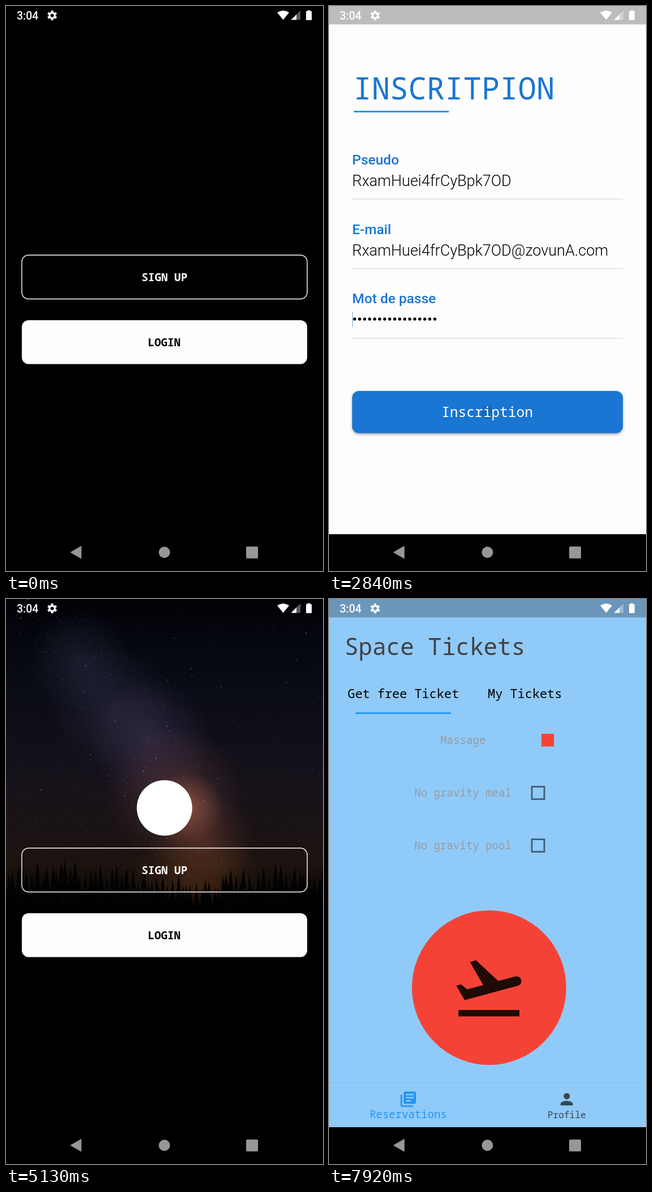
An HTML page with a canvas that plays this animation: 561 by 998 pixels, repeating every 8000 ms.

```html
<!DOCTYPE html>
<html lang="fr">
<head>
<meta charset="utf-8">
<title>Space tickets</title>
<style>
html, body { margin: 0; width: 100%; height: 100%; overflow: hidden; background: #000; }
canvas { display: block; width: 100vw; height: 100vh; }
</style>
</head>
<body>
<canvas id="stage"></canvas>
<script>
const W = 561, H = 998, BODY = 933, LOOP = 8000;
const MONO = '"Noto Sans Mono", "DejaVu Sans Mono", monospace';
const SANS = 'Roboto, "Open Sans", sans-serif';
const BLUE = '#1976d2', ACCENT = '#2196f3', SKY = '#90caf9', RED = '#f44336', PAPER = '#fdfdfd';
const USER = 'RxamHuei4frCyBpk7OD', MAIL = USER + '@zovunA.com';
const SHADE = 'rgba(0,0,0,.26)';

const ICONS = {
  books: new Path2D('M4 6H2v14c0 1.1.9 2 2 2h14v-2H4V6zm16-4H8c-1.1 0-2 .9-2 2v12c0 1.1.9 2 2 2h12c1.1 0 2-.9 2-2V4c0-1.1-.9-2-2-2zm-1 9H9V9h10v2zm-4 4H9v-2h6v2zm4-8H9V5h10v2z'),
  person: new Path2D('M12 12c2.21 0 4-1.79 4-4s-1.79-4-4-4-4 1.79-4 4 1.79 4 4 4zm0 2c-2.67 0-8 1.34-8 4v2h16v-2c0-2.66-5.33-4-8-4z'),
  takeoff: new Path2D('M2.5 19h19v2h-19zm19.57-9.36c-.21-.8-1.04-1.28-1.84-1.06L14.92 10l-6.9-6.43-1.93.51 4.14 7.17-4.97 1.33-1.97-1.54-1.45.39 1.82 3.16.77 1.33 1.6-.43 5.31-1.42 4.35-1.16L21 11.49c.81-.23 1.28-1.05 1.07-1.85z')
};

const canvas = document.getElementById('stage');
const dpr = window.devicePixelRatio || 1;
canvas.width = W * dpr;
canvas.height = H * dpr;
const g = canvas.getContext('2d');

const clamp = v => Math.max(0, Math.min(1, v));
const prog = (t, a, b) => clamp((t - a) / (b - a));
const easeOut = p => 1 - (1 - p) ** 3;
const mix = (a, b, p) => a + (b - a) * p;

function text(str, x, y, font, color, align = 'left') {
  g.font = font;
  g.fillStyle = color;
  g.textAlign = align;
  g.fillText(str, x, y);
}

function rect(x, y, w, h, color) {
  g.fillStyle = color;
  g.fillRect(x, y, w, h);
}

function disc(x, y, r, color) {
  g.fillStyle = color;
  g.beginPath();
  g.arc(x, y, r, 0, Math.PI * 2);
  g.fill();
}

function poly(color, ...pts) {
  g.fillStyle = color;
  g.beginPath();
  pts.forEach(p => g.lineTo(p[0], p[1]));
  g.fill();
}

function roundRect(x, y, w, h, r) {
  g.beginPath();
  g.roundRect(x, y, w, h, r);
}

function icon(name, x, y, scale, color) {
  g.save();
  g.translate(x, y);
  g.scale(scale, scale);
  g.fillStyle = color;
  g.fill(ICONS[name]);
  g.restore();
}

function layer(alpha, dx, dy, draw) {
  if (alpha <= 0) return;
  g.save();
  g.globalAlpha = alpha;
  g.translate(dx, dy);
  draw();
  g.restore();
}

// Night sky, painted once
const sky = (() => {
  const c = document.createElement('canvas');
  c.width = W;
  c.height = 560;
  const s = c.getContext('2d');
  let seed = 11;
  const rnd = () => (seed = seed * 16807 % 2147483647) / 2147483647;
  const base = s.createLinearGradient(0, 0, 0, 560);
  [[0, '#020308'], [.3, '#0a0c16'], [.6, '#17121a'], [.84, '#1c130f'], [1, '#000']]
    .forEach(([p, col]) => base.addColorStop(p, col));
  s.fillStyle = base;
  s.fillRect(0, 0, W, 560);

  const haze = (x, y, r, rgb, a) => {
    const grad = s.createRadialGradient(x, y, 0, x, y, r);
    grad.addColorStop(0, `rgba(${rgb},${a})`);
    grad.addColorStop(1, `rgba(${rgb},0)`);
    s.fillStyle = grad;
    s.fillRect(x - r, y - r, r * 2, r * 2);
  };
  haze(130, 110, 90, '60,62,92', .35);
  haze(190, 190, 110, '66,62,96', .35);
  haze(255, 250, 110, '80,68,110', .4);
  haze(300, 345, 120, '120,70,70', .45);
  haze(320, 370, 65, '200,115,80', .55);
  haze(350, 430, 90, '130,70,60', .4);
  haze(335, 530, 130, '130,70,25', .4);

  for (let i = 0; i < 620; i++) {
    const y = rnd() * 500;
    const x = i % 2 ? rnd() * W : 70 + y * .62 + (rnd() + rnd() - 1) * 130;
    const size = rnd() < .06 ? 1.8 : 1;
    s.fillStyle = `rgba(175,175,215,${.1 + rnd() * .5})`;
    s.fillRect(x, y, size, size);
  }

  s.fillStyle = '#030303';
  for (let x = -6; x < W + 8; x += 5 + rnd() * 7) {
    const side = Math.abs(x - 330) / 330;
    const top = 522 - side * 28 - rnd() * 36;
    for (let k = 0; k < 4; k++) {
      const y = top + k * 13, half = 3 + k * 2.4;
      s.beginPath();
      s.moveTo(x, y - 8);
      s.lineTo(x + half, y + 14);
      s.lineTo(x - half, y + 14);
      s.fill();
    }
  }
  const fade = s.createLinearGradient(0, 510, 0, 552);
  fade.addColorStop(0, 'rgba(0,0,0,0)');
  fade.addColorStop(1, '#000');
  s.fillStyle = fade;
  s.fillRect(0, 510, W, 50);
  return c;
})();

function welcome(photo) {
  rect(0, 0, W, H, '#000');
  if (photo) {
    g.drawImage(sky, 0, 0);
    disc(280.5, 369, 49, '#fff');
  }
  roundRect(28, 440, 505, 77.5, 12);
  g.strokeStyle = '#fff';
  g.lineWidth = 1.4;
  g.stroke();
  text('SIGN UP', 280.5, 486, `700 19.3px ${MONO}`, '#fff', 'center');
  roundRect(28, 555, 505, 77.5, 12);
  g.fillStyle = PAPER;
  g.fill();
  text('LOGIN', 280, 601, `700 19.3px ${MONO}`, '#000', 'center');
}

function field(t, f, size) {
  text(f.label, 41, f.y, `500 ${size}px ${SANS}`, BLUE);
  rect(41, f.line, 479, 1.2, '#dadada');
  if (t < f.at) return;
  if (f.value) text(f.value, 41, f.y + f.drop, `300 27px ${SANS}`, '#000');
  else for (let i = 0; i < 17; i++) disc(45.3 + i * 8.87, f.y + f.drop, 2.7, '#000');
  if (t < f.until && (t - f.at) % 1000 < 500) rect(41, f.y + 15, 1, 27, '#7fa5c0');
}

function button(label, y, on, ripple) {
  g.save();
  roundRect(41, y, 479, 74.5, 12);
  if (on) {
    g.shadowColor = 'rgba(0,0,0,.36)';
    g.shadowBlur = 5 * dpr;
    g.shadowOffsetY = 2 * dpr;
  }
  g.fillStyle = on ? BLUE : SHADE;
  g.fill();
  g.restore();
  if (ripple > 0) disc(280.5, y + 37.5, 23.5 * ripple, 'rgba(0,0,0,.13)');
  text(label, 280, y + 46, `500 24.5px ${MONO}`, '#fff', 'center');
}

const signUpFields = [
  { label: 'Pseudo', value: USER, y: 279.5, drop: 38, line: 340.5, at: 950, until: 1300 },
  { label: 'E-mail', value: MAIL, y: 402.5, drop: 38, line: 463.3, at: 1300, until: 1670 },
  { label: 'Mot de passe', y: 525, drop: 28, line: 586.3, at: 1670, until: 3210 }
];
const loginFields = [
  { label: 'E-mail', value: MAIL, y: 365.5, drop: 38, line: 426.8, at: 6420, until: 6700 },
  { label: 'Mot de passe', y: 501.5, drop: 28, line: 563, at: 6700, until: 7340 }
];

function signUp(t) {
  rect(0, 0, W, BODY, PAPER);
  text('INSCRITPION', 43, 165, `500 54px ${MONO}`, BLUE);
  rect(44, 185, 168, 3, ACCENT);
  signUpFields.forEach(f => field(t, f, 24.5));
  button('Inscription', 680, t >= 1670, prog(t, 2680, 3000));
}

function login(t) {
  rect(0, 0, W, BODY, PAPER);
  text('CONNEXION', 40.5, 153, `500 41px ${MONO}`, BLUE);
  rect(44, 169, 231, 3, ACCENT);
  loginFields.forEach(f => field(t, f, 27.2));
  button('Connexion', 776.7, t >= 6700, prog(t, 7000, 7200));
}

// Arc of light at the page edge after the slide
function glow(t, start, right) {
  const rise = easeOut(prog(t, start + 110, start + 220));
  const left = (1 - prog(t, start + 340, start + 790)) ** 2;
  const s = .48 * rise * left;
  if (s < .002) return;
  g.save();
  if (right) {
    g.translate(W, 0);
    g.scale(-1, 1);
  }
  g.beginPath();
  g.rect(0, 0, W, BODY);
  g.clip();
  g.fillStyle = `rgba(33,150,243,${.42 * rise * Math.sqrt(left)})`;
  g.beginPath();
  g.ellipse((177 - 1398) * s, 425, 1398 * s, 1398, 0, 0, Math.PI * 2);
  g.fill();
  g.restore();
}

function slide(t, start, dir, photo, page) {
  const p = easeOut(prog(t, start, start + 220));
  if (p < 1) layer(1, -dir * W * p, 0, () => welcome(photo));
  layer(1, dir * W * (1 - p), 0, () => page(t));
  glow(t, start, dir > 0);
}

function checkRow(label, x, y, boxX, checked) {
  text(label, x, y, `500 19.1px ${MONO}`, '#9a9a9a');
  g.strokeStyle = 'rgba(0,0,0,.54)';
  g.lineWidth = 2.8;
  if (checked < 1) g.strokeRect(boxX - 11, y - 17.5, 22, 22);
  layer(checked, 0, 0, () => rect(boxX - 11, y - 18, 22, 22.5, RED));
}

function tickets(checked) {
  text('Space Tickets', 27.5, 99, `500 41px ${MONO}`, '#424242');
  text('Get free Ticket', 33, 175, `500 21.9px ${MONO}`, '#000');
  text('My Tickets', 281, 175, `500 21.9px ${MONO}`, '#000');
  rect(47, 200.3, 169, 2.8, ACCENT);
  checkRow('Massage', 197, 256, 387, checked);
  checkRow('No gravity meal', 151, 349, 370, 0);
  checkRow('No gravity pool', 151, 442, 370, 0);
  disc(283.3, 686.5, 136.5, RED);
  icon('takeoff', 214.8, 618, 5.68, '#1f0a06');
}

function tab(name, label, cx, sel) {
  const color = `rgb(${[[55, 33], [71, 150], [79, 243]].map(c => Math.round(mix(c[0], c[1], sel)))})`;
  icon(name, cx - 16.4, 867.2, 1.37, color);
  text(label, cx, 917, `500 ${mix(16.2, 19, sel)}px ${MONO}`, color, 'center');
}

function home(content, checked, profile) {
  rect(0, 0, W, BODY, SKY);
  layer(content * (1 - profile) * g.globalAlpha, 0, 0, () => tickets(checked));
  rect(0, 854.5, W, 1, 'rgba(0,0,0,.07)');
  tab('books', 'Reservations', 140.3, 1 - profile);
  tab('person', 'Profile', 420.7, profile);
}

function openHome(t, start, checked, profile) {
  const p = easeOut(prog(t, start, start + 190));
  const content = prog(t, start + 290, start + 450);
  layer(p, 0, (1 - p) * 90, () => home(content, checked, profile));
}

function gear(x, y) {
  g.fillStyle = '#fff';
  g.beginPath();
  for (let i = 0; i < 6; i++) {
    const a = i * Math.PI / 3 + Math.PI / 6 + Math.PI / 3;
    [[-.34, 6.3], [-.22, 8.8], [.22, 8.8], [.34, 6.3]]
      .forEach(([d, r]) => g.lineTo(x + r * Math.cos(a + d), y + r * Math.sin(a + d)));
  }
  g.closePath();
  g.moveTo(x + 3, y);
  g.arc(x, y, 3, 0, Math.PI * 2);
  g.fill('evenodd');
}

function systemBars() {
  rect(0, 0, W, 32.5, SHADE);
  text('3:04', 19, 24, `500 19.5px ${SANS}`, '#fff');
  gear(81.7, 16.7);
  g.fillStyle = '#fff';
  g.beginPath();
  g.moveTo(490.5, 24.5);
  g.lineTo(480, 11.6);
  g.quadraticCurveTo(490.5, 4.2, 501, 11.6);
  g.fill();
  poly('rgba(255,255,255,.35)', [504.5, 24.5], [521, 8], [521, 24.5]);
  poly('#fff', [504.5, 24.5], [514, 15], [514, 24.5]);
  rect(533.5, 7.5, 4.5, 3, '#fff');
  roundRect(531, 9, 10, 16, 1.2);
  g.fill();

  rect(0, BODY, W, H - BODY, '#000');
  poly('#979797', [113.5, 965], [133.5, 953.5], [133.5, 976.5]);
  disc(280.3, 965, 10, '#979797');
  roundRect(425, 954.8, 21, 21, 2);
  g.fill();
}

function render(t) {
  g.setTransform(dpr, 0, 0, dpr, 0, 0);
  if (t < 4920) {
    if (t < 40) welcome(false);
    else if (t < 3400) slide(t, 40, 1, false, signUp);
    if (t >= 3210) openHome(t, 3210, 0, easeOut(prog(t, 4090, 4290)));
  } else {
    if (t < 5130) home(1, 0, 1);
    if (t < 5500) layer(prog(t, 4880, 5100), 0, 0, () => welcome(true));
    else if (t < 7530) slide(t, 5500, -1, true, login);
    if (t >= 7340) openHome(t, 7340, prog(t, 7830, 7910), 0);
  }
  systemBars();
}

function tick() {
  render(performance.now() % LOOP);
  requestAnimationFrame(tick);
}
tick();
</script>
</body>
</html>
```
